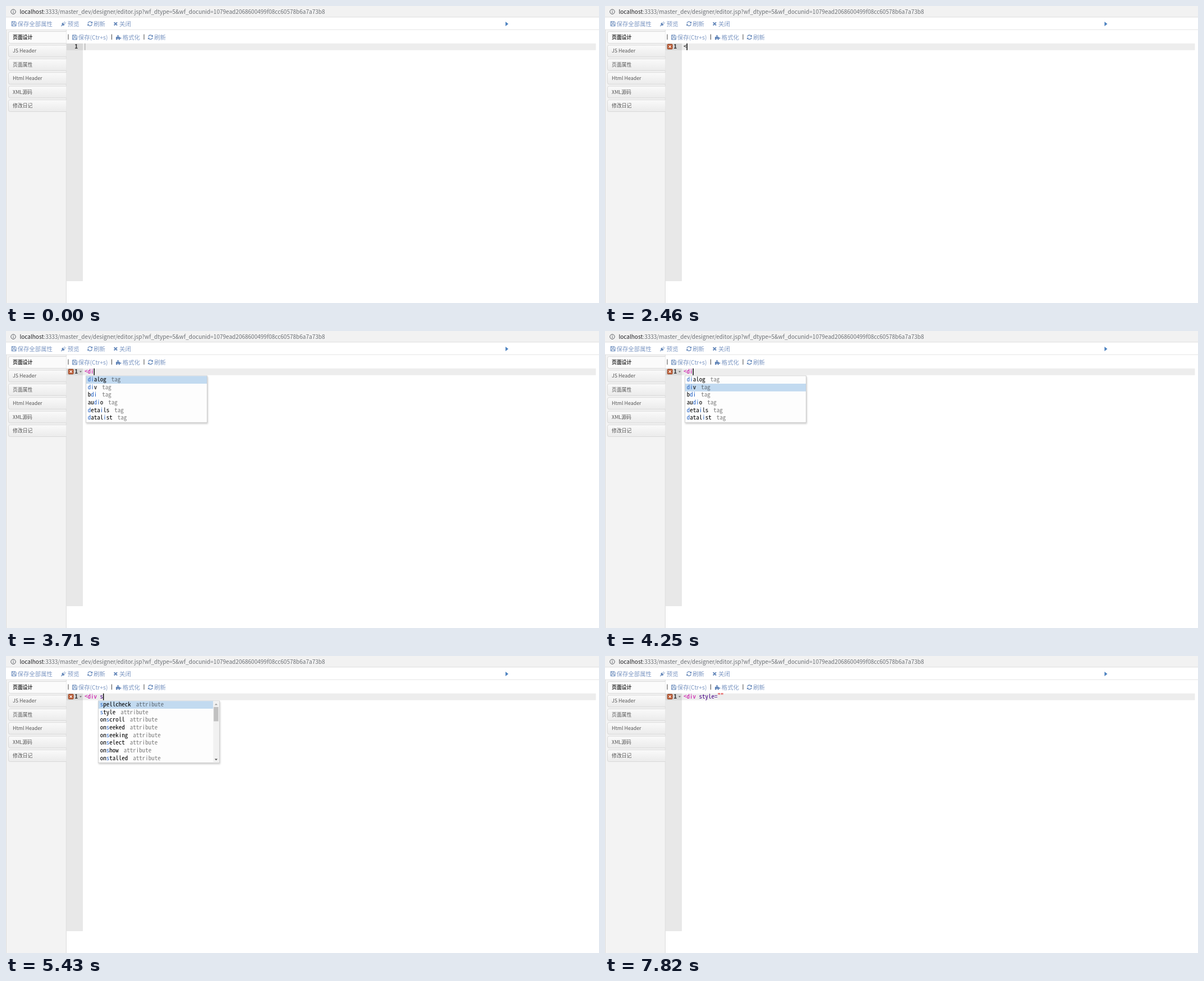
An HTML page for the animation above (8 s loop, 1057 by 530 pixels).

```html
<!DOCTYPE html>
<html lang="zh-CN">
<head>
<meta charset="utf-8">
<title>Editor</title>
<style>
  html, body { margin: 0; width: 100%; height: 100%; overflow: hidden; background: #fff; }
  svg { display: block; width: 1057px; height: 530px; }
  text { white-space: pre; font-family: "Noto Sans CJK SC", "Noto Sans", sans-serif; }
  .url { font-size: 10.03px; fill: #6b6f74; }
  .host { fill: #202124; }
  .tool text { font-size: 10.4px; fill: #7c97c3; }
  .ico { fill: none; stroke: #6588ba; stroke-width: 1; }
  .solid { fill: #6588ba; stroke: none; }
  .tab path { fill: url(#tabFill); stroke: #d2d2d2; stroke-width: .8; }
  .tab text { font-size: 8.85px; fill: #555; }
  .tab.on path { fill: #fbfbfb; }
  .tab.on text { fill: #333; font-weight: bold; }
  .code text { font-family: "Noto Sans Mono CJK SC", "Noto Sans Mono", monospace; font-size: var(--code, 11px); fill: #000; }
  .code .num { font-weight: bold; fill: #333; }
  .code .tag { fill: #c800a4; }
  .code .attr { fill: #450084; }
  .code .str { fill: #df0002; }
  .code .hit { fill: #2d69c7; }
  .code .meta { opacity: .5; }
  .box { fill: #fdfdfd; stroke: #c8c8c8; stroke-width: .8; filter: drop-shadow(1.4px 2px 1.8px rgba(0, 0, 0, .2)); }
</style>
</head>
<body>
<svg viewBox="0 0 1057 530">
  <defs>
    <linearGradient id="tabFill" x1="0" y1="0" x2="0" y2="1">
      <stop offset="0" stop-color="#fafafa"/><stop offset="1" stop-color="#ebebeb"/>
    </linearGradient>
    <g id="save" class="ico">
      <path d="M.5 .5H7L8.5 2V8.5H.5ZM2.3 .5V3.2H6V.5M2.2 8.5V5.3H6.8V8.5"/>
    </g>
    <g id="plug">
      <path class="solid" d="M2.7 2.4L6.6 6.3Q5 8.4 2.6 7.4L.8 9.2L0 8.4L1.7 6.6Q.7 4.2 2.7 2.4Z"/>
      <path class="ico" d="M4.3 3.3L7 .6M5.9 4.9L8.6 2.2"/>
    </g>
    <g id="refresh">
      <path class="ico" style="stroke-width:1.3" d="M.8 3.7A3.8 3.8 0 0 1 7.6 2.3M8.2 5.3A3.8 3.8 0 0 1 1.4 6.7"/>
      <path class="solid" d="M9 .4V3.8H5.6ZM0 8.6V5.2H3.4Z"/>
    </g>
    <path id="cross" class="ico" style="stroke-width:2" d="M.9 .9L6.3 6.3M6.3 .9L.9 6.3"/>
    <path id="puzzle" class="solid" d="M0 4H2.7Q1.7 1 3.6 .8Q5.5 1 4.5 4H7V5.8Q9.3 4.6 9.6 6.5Q9.3 8.2 7 7.2V9.2H4.6Q5.2 7.3 3.6 7.2Q2 7.3 2.7 9.2H0Z"/>
  </defs>

  <rect width="1057" height="20" fill="#f2f2f2"/>
  <rect y="19.5" width="1057" height=".8" fill="#d8d8d8"/>
  <g fill="none" stroke="#55595e">
    <circle cx="13" cy="10.2" r="4.2"/><path d="M13 9.6V12.6M13 7.6V8.7"/>
  </g>
  <text class="url" x="24.4" y="13.6"><tspan class="host">localhost</tspan>:3333/master_dev/designer/editor.jsp?wf_dtype=5&amp;wf_docunid=1079ead2068600499f08cc60578b6a7a73b8</text>

  <rect y="42" width="107" height="488" fill="#f3f3f3"/>
  <path d="M.4 42V530M107.4 42V530" stroke="#d4d4d4" stroke-width=".8"/>
  <path d="M0 42.2H1057" stroke="#dedede" stroke-width=".8"/>
  <path d="M890.4 28L895.4 32L890.4 36Z" fill="#4a80bf"/>

  <g class="tool">
    <use href="#save" x="9.6" y="27.2"/><text x="20.6" y="35.5">保存全部属性</text>
    <use href="#plug" x="98" y="27.2"/><text x="109.8" y="35.5">预览</text>
    <use href="#refresh" x="145.2" y="27.1"/><text x="156.2" y="35.5">刷新</text>
    <use href="#cross" x="191.8" y="28.2"/><text x="202" y="35.5">关闭</text>
    <use href="#save" x="118" y="51.4"/><text x="128.8" y="59.6">保存(Ctr+s)</text>
    <use href="#puzzle" x="196" y="51"/><text x="207.8" y="59.6">格式化</text>
    <use href="#refresh" x="253" y="51.2"/><text x="264.2" y="59.6">刷新</text>
  </g>
  <path d="M111 50.5V60M188.5 50.5V60M246 50.5V60" stroke="#333" stroke-width=".9"/>
  <g id="tabs"></g>

  <rect x="108" y="67" width="29" height="424" fill="#e8e8e8"/>
  <rect x="108" y="66.8" width="29" height="12" fill="#d8d8d8"/>
  <rect x="137" y="66.8" width="914.5" height="12" fill="#ededed"/>
  <g class="code">
    <text class="num" x="122.4" y="75.7">1</text>
    <g id="live"></g>
  </g>
</svg>
<script>
const LOOP = 8000, CHAR = 5.5, ROW = 13.72, LEFT = 140;
const $ = id => document.getElementById(id);
const esc = s => s.replace(/</g, '&lt;');
const span = (cls, s) => s ? `<tspan class="${cls}">${esc(s)}</tspan>` : '';
const rect = (x, y, w, h, fill, more = '') =>
  `<rect x="${x}" y="${y}" width="${w}" height="${h}" fill="${fill}" ${more}/>`;

// Pick the font size that gives the editor's column width
const pen = document.createElement('canvas').getContext('2d');
pen.font = '100px "Noto Sans Mono CJK SC", "Noto Sans Mono", monospace';
document.documentElement.style.setProperty('--code', CHAR * 100 / pen.measureText('n').width + 'px');

$('tabs').innerHTML = ['页面设计', 'JS Header', '页面属性', 'Html Header', 'XML源码', '修改日记'].map((name, i) => {
  const y = 45.5 + i * 24.4;
  return `<g class="tab${i ? '' : ' on'}">
    <path d="M107.4 ${y}H7.6Q4.4 ${y} 4.4 ${y + 3}V${y + 18}Q4.4 ${y + 21} 7.6 ${y + 21}H107.4"/>
    <text x="12.1" y="${y + 13.5}">${name}</text></g>`;
}).join('');

// Completion lists: typed filter, column, kind, scroll thumb height, words
const lists = {
  d: { find: 'd', col: 1, kind: 'tag', thumb: 30, words: 'datalist dd del details dfn dialog div dl' },
  di: { find: 'di', col: 1, kind: 'tag', thumb: 0, words: 'dialog div bdi audio details datalist' },
  s: { find: 's', col: 5, kind: 'attribute', thumb: 25.5, words: 'spellcheck style onscroll onseeked onseeking onselect onshow onstalled' },
  st: { find: 'st', col: 5, kind: 'attribute', thumb: 79, words: 'style onstalled ondragstart onloadstart onreset onselect onsubmit translate' }
};

// Start time, line, caret column, caret opacity, list, selected row
const steps = [
  [0, '', 0, .25],
  [610, '', 0, 1],
  [1120, '', 0, 0],
  [1510, '', 0, 1],
  [2050, '<', 1, 1],
  [2460, '<', 1, 1],
  [2590, '<d', 2, 1, 'd', 0],
  [2720, '<di', 3, 1, 'di', 0],
  [3350, '<di', 3, 0, 'di', 0],
  [3710, '<di', 3, 1, 'di', 0],
  [4250, '<di', 3, 1, 'di', 1],
  [4320, '<di', 3, 0, 'di', 1],
  [4730, '<di', 3, 1, 'di', 1],
  [4790, '<div', 4, 1],
  [5120, '<div ', 5, 1],
  [5430, '<div s', 6, 1, 's', 0],
  [5910, '<div st', 7, 1, 'st', 0],
  [6510, '<div st', 7, 0, 'st', 0],
  [6910, '<div st', 7, 1, 'st', 0],
  [7200, '<div style=""', 12, 1],
  [7820, '<div style=""', 12, 0]
];

function paintLine(line) {
  if (line.length < 2) return esc(line);
  const [, tag, attr, str] = line.match(/^(<\w*)([^"]*)(.*)$/);
  return span('tag', tag) + span('attr', attr) + span('str', str);
}

function paintWord(word, find) {
  let from = 0, out = '';
  for (const ch of find) {
    const at = word.indexOf(ch, from);
    out += word.slice(from, at) + span('hit', ch);
    from = at + 1;
  }
  return out + word.slice(from);
}

function popup({ find, col, kind, thumb, words }, sel) {
  const items = words.split(' '), x = LEFT + col * CHAR - 3, y = 79.9, w = 216;
  const h = items.length * ROW + 1, inner = thumb ? w - 11.5 : w - .8;
  let out = rect(x, y, w, h, '#fdfdfd', 'class="box"');
  out += rect(x + .4, y + .4 + sel * ROW, inner, ROW, '#c2daf0');
  items.forEach((word, i) => {
    const base = 89.8 + i * ROW, tx = x + 3.2;
    out += `<text x="${tx}" y="${base}">${paintWord(word, find)}</text>`;
    out += `<text class="meta" x="${tx + word.length * CHAR + 9}" y="${base}">${kind}</text>`;
  });
  if (thumb) {
    const bx = x + w - 11.2, mid = bx + 5.2, end = y + h;
    out += rect(bx, y + .4, 10.8, h - .8, '#f1f1f1') + rect(bx + .9, 91, 8.4, thumb, '#c1c1c1');
    out += `<path d="M${mid - 2.6} 87.4h5.2l-2.6 -2.7z" fill="#a0a0a0"/>`;
    out += `<path d="M${mid - 2.6} ${end - 7.2}h5.2l-2.6 2.7z" fill="#505050"/>`;
  }
  return out;
}

function render([time, line, col, alpha, list, sel]) {
  let out = '';
  if (time >= 2460) {
    out += rect(111.2, 68, 9, 9, '#b8562f', 'rx="1.2" stroke="#8f4527" stroke-width=".7"');
    out += '<path d="M113.6 70.4l4.2 4.2m0 -4.2l-4.2 4.2" stroke="#fff" stroke-width="1.3"/>';
  }
  if (line.length > 1) out += '<path d="M131 71.6h4l-2 2.4z" fill="#666"/>';
  out += `<text x="${LEFT}" y="75.7">${paintLine(line)}</text>`;
  if (list) out += popup(lists[list], sel);
  out += rect(LEFT + col * CHAR, 66.8, 1.4, 12, '#000', `opacity="${alpha}"`);
  $('live').innerHTML = out;
}

let shown;
function tick() {
  const t = performance.now() % LOOP;
  const step = steps.findLast(s => s[0] <= t);
  if (step !== shown) render(shown = step);
  requestAnimationFrame(tick);
}
tick();
</script>
</body>
</html>
```
